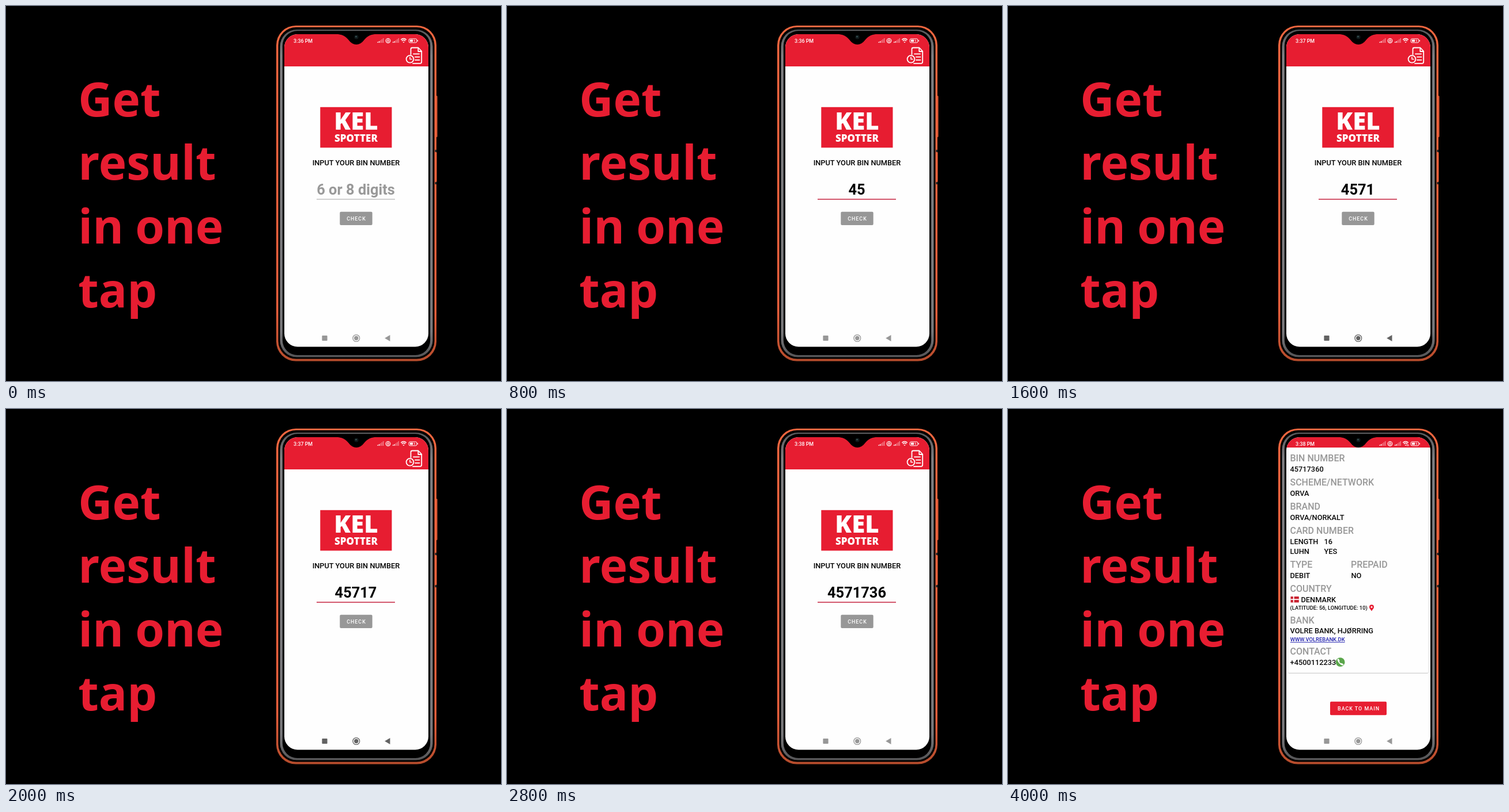
These frames come from a looping animation (859 by 652 pixels, 6 s). An HTML page:

```html
<!DOCTYPE html>
<html lang="en">
<head>
<meta charset="utf-8">
<title>Get result in one tap</title>
<style>
  html, body { margin: 0; width: 100%; height: 100%; overflow: hidden; background: #000; }
  svg { display: block; width: 100%; height: 100%; }
  text { font-family: Roboto, sans-serif; font-weight: 500; white-space: pre; }
  .headline text { font: 700 82px "Open Sans", sans-serif; word-spacing: -1.2px; }
  .badge text { font-family: "Open Sans", sans-serif; font-weight: 800; fill: #fff; }
  .red { fill: #e71d31; }
  .middle { text-anchor: middle; }
  .button { font-size: 8.9px; letter-spacing: 1px; fill: #fff; }
  .label { font-size: 16px; fill: #989898; }
  .value { font-size: 12.8px; fill: #0b0b0b; }
  .small { font-size: 9.4px; fill: #0b0b0b; }
  #entry { font-size: 25.4px; font-weight: 700; }
</style>
</head>
<body>
<svg viewBox="0 0 859 652">
  <defs>
    <linearGradient id="shell" x2="0" y2="1">
      <stop stop-color="#f0663f"/><stop offset=".85" stop-color="#e85f3c"/><stop offset="1" stop-color="#b54c2c"/>
    </linearGradient>
    <linearGradient id="bevel" x2="0" y2="1">
      <stop stop-color="#58585a"/><stop offset=".08" stop-color="#808083"/>
      <stop offset=".92" stop-color="#7a7a7d"/><stop offset="1" stop-color="#555557"/>
    </linearGradient>
    <clipPath id="screen"><rect x="483" y="49" width="250" height="543.5" rx="23"/></clipPath>
    <g id="signal" stroke="#fff" stroke-width="1.3">
      <path d="M.7 8V6.3M3.1 8V5"/>
      <path d="M5.5 8V3.4M7.9 8V1.8M10.2 8V0" opacity=".5"/>
    </g>
  </defs>

  <g class="headline red">
    <text x="125.2" y="191.8">Get</text>
    <text x="125.2" y="302.2">result</text>
    <text x="125.2" y="412.6">in one</text>
    <text x="125.2" y="523.6">tap</text>
  </g>

  <!-- Phone body -->
  <rect x="744" y="156" width="4.600" height="72" rx="1.5" fill="#d05332"/>
  <rect x="744" y="254" width="3.6" height="52" rx="1.5" fill="#d05332"/>
  <rect x="469" y="34" width="278" height="583.5" rx="34" fill="url(#shell)"/>
  <rect x="472.5" y="37" width="271" height="576.5" rx="31"/>
  <rect x="475.5" y="41" width="265" height="569.5" rx="29" fill="url(#bevel)"/>
  <rect x="479.8" y="43.2" width="256.4" height="563.8" rx="26"/>
  <path d="M746 250v4M746 306v4" stroke="#222" stroke-width="3"/>

  <g clip-path="url(#screen)">
    <path d="M483 49h250v544h-250z" fill="#fefefe"/>
    <rect id="header" class="red" x="483" y="49" width="250" height="56"/>

    <g id="form">
      <g fill="none" stroke="#fff" stroke-width="1.8" stroke-linejoin="round" stroke-linecap="round">
        <path d="M702.5 84V75q0-2.5 2.5-2.5h10.5l5.7 6V97q0 2.8-2.7 2.8H706M715.3 73v6h5.7M707 83.3h10M710 88.6h7.5M710 93.8h7.5"/>
        <circle cx="701" cy="92.3" r="6.4" class="red"/>
        <path d="M701 88.7v3.8h3" stroke-width="1.5"/>
      </g>
      <g class="badge middle">
        <rect class="red" x="545.3" y="175.8" width="124.2" height="70.5"/>
        <text x="607.5" y="215" font-size="42">KEL</text>
        <text x="607.5" y="236.2" font-size="17">SPOTTER</text>
      </g>
      <text class="middle" x="607.5" y="277.4" font-size="12.8">INPUT YOUR BIN NUMBER</text>
      <text id="entry" class="middle" x="607" y="327.5"></text>
      <path id="underline" d="M539 336h136"/>
      <rect id="check" x="579.3" y="357.8" width="56.4" height="23.3" rx="2"/>
      <text class="button middle" x="608" y="373">CHECK</text>
    </g>

    <g id="result">
      <path d="M485.5 67V457q0 2 2 2H728q2 0 2-2V67" fill="#fefefe" stroke="#e6e6e6"/>
      <path d="M487 459.4H728.5" stroke="#cfcfcf"/>
      <g id="rows"></g>
      <path d="M490.5 326h14.3v10.4h-14.3z" fill="#c8202f"/>
      <path d="M495.7 326v10.4M490.5 331.2h14.3" stroke="#fff" stroke-width="1.8"/>
      <path d="M631 351.5C629 347.8 627 346.6 627 344.2a4 4 0 0 1 8 0C635 346.6 633 347.8 631 351.5z" class="red"/>
      <circle cx="631" cy="344.3" r="1.5" fill="#fff"/>
      <circle cx="576.6" cy="440.2" r="7.9" fill="#5aa64b"/>
      <path d="M573.2 436.2q.2 6.2 7.2 7.8" fill="none" stroke="#fff" stroke-width="1.8"/>
      <path d="M573 435.8l1 2.4M578.2 443.3l2.5 1" stroke="#fff" stroke-width="3" stroke-linecap="round"/>
      <rect class="red" x="559" y="508.8" width="98" height="23.4" rx="2"/>
      <text class="button middle" x="608.5" y="524">BACK TO MAIN</text>
    </g>

    <!-- Status bar -->
    <text id="clock" x="499" y="63.5" font-size="8.9" fill="#fff"></text>
    <use href="#signal" x="644.5" y="56"/>
    <use href="#signal" x="671" y="56"/>
    <g fill="none" stroke="#fff">
      <circle cx="663" cy="60.3" r="3.8" stroke-width="1.2"/>
      <path d="M661.4 60h3.2v2h-3.2zM662 60v-1.3a1 1 0 0 1 2 0V60" stroke-width=".8"/>
      <path d="M685.3 58.6q4.7-4 9.4 0M686.9 60.6q3.1-2.6 6.2 0" stroke-width="1.4"/>
      <path d="M688.3 62.2h3.4L690 64.3z" fill="#fff" stroke="none"/>
      <path id="traffic" d="M692.7 64.5v-3M694.8 61.5v3" stroke-width="1"/>
      <rect x="699.2" y="57" width="13.6" height="6.8" rx="2" stroke-width="1"/>
      <path d="M714.3 59v2.8" stroke-width="1.2"/>
      <path d="M701 58.5h5v3.8h-5z" fill="#fff" stroke="none"/>
      <path d="M708.8 58.3l-1 2.1h2l-1 2.1" stroke-width=".7"/>
    </g>

    <g id="nav">
      <rect x="548.4" y="573" width="9.2" height="9" rx="1" stroke="none"/>
      <circle cx="607.8" cy="577.5" r="5.9" fill="none" stroke-width="1.3"/>
      <circle cx="607.8" cy="577.5" r="3.7" stroke="none"/>
      <path d="M657.2 577.5l9.3-5.6v11.2z" stroke="none"/>
    </g>
  </g>

  <!-- Camera notch -->
  <path d="M570 48.5C584 49 589 52.5 594.5 59C602 69.5 614 69.5 621.5 59C627 52.5 632 49 646 48.5z"/>
  <circle cx="608" cy="54" r="3.6" fill="#10191b"/>
  <circle cx="607.5" cy="53.3" r="1.2" fill="#3c5a5c"/>
</svg>

<script>
const $ = id => document.getElementById(id);
const RED = "#e71d31", GREY = "#979797";
const DIGITS = "45717360";
const STEP = 400, RESULT_AT = 4000, LOOP = 6000;

const rows = [
  ["label", 91.3, "BIN NUMBER"], ["value", 109.2, DIGITS],
  ["label", 133.2, "SCHEME/NETWORK"], ["value", 151, "ORVA"],
  ["label", 175, "BRAND"], ["value", 193, "ORVA/NORKALT"],
  ["label", 217, "CARD NUMBER"],
  ["value", 234.6, "LENGTH"], ["value", 234.6, "16", 548.5],
  ["value", 251.8, "LUHN"], ["value", 251.8, "YES", 548.5],
  ["label", 276, "TYPE"], ["label", 276, "PREPAID", 595],
  ["value", 293.8, "DEBIT"], ["value", 293.8, "NO", 595.5],
  ["label", 317.8, "COUNTRY"], ["value", 335.6, "DENMARK", 508.5],
  ["small", 349.2, "(LATITUDE: 56, LONGITUDE: 10)"],
  ["label", 372.6, "BANK"], ["value", 390.4, "VOLRE BANK, HJØRRING"],
  ["small", 404.2, "WWW.VOLREBANK.DK", 489.8, "fill:#1f1fae;text-decoration:underline"],
  ["label", 427.4, "CONTACT"], ["value", 445, "+4500112233"],
];
$("rows").innerHTML = rows.map(([kind, y, text, x = 489.5, style = ""]) =>
  `<text class="${kind}" x="${x}" y="${y}" style="${style}">${text}</text>`).join("");

function set(id, attributes) {
  for (const name in attributes) $(id).setAttribute(name, attributes[name]);
}

function draw() {
  const time = performance.now() % LOOP;
  const done = time >= RESULT_AT;
  const typed = Math.min(Math.floor(time / STEP), DIGITS.length);
  const minute = Math.min(Math.floor(typed / 3), 2);
  const ready = typed === 6 || typed === 8;
  const navColor = minute === 1 ? "#626262" : GREY;

  set("form", { display: done ? "none" : "inline" });
  set("result", { display: done ? "inline" : "none" });
  set("header", { height: done ? 18 : 56 });
  set("entry", { fill: typed ? "#000" : "#999" });
  set("underline", { stroke: typed ? "#c4203c" : "#a0a0a0", "stroke-width": typed ? 1.6 : 1 });
  set("check", { fill: ready ? RED : GREY });
  set("nav", { fill: navColor, stroke: navColor });
  set("traffic", { display: typed === 3 || typed === 8 ? "inline" : "none" });
  $("entry").textContent = DIGITS.slice(0, typed) || "6 or 8 digits";
  $("clock").textContent = `3:${36 + minute} PM`;
  requestAnimationFrame(draw);
}
draw();
</script>
</body>
</html>
```
